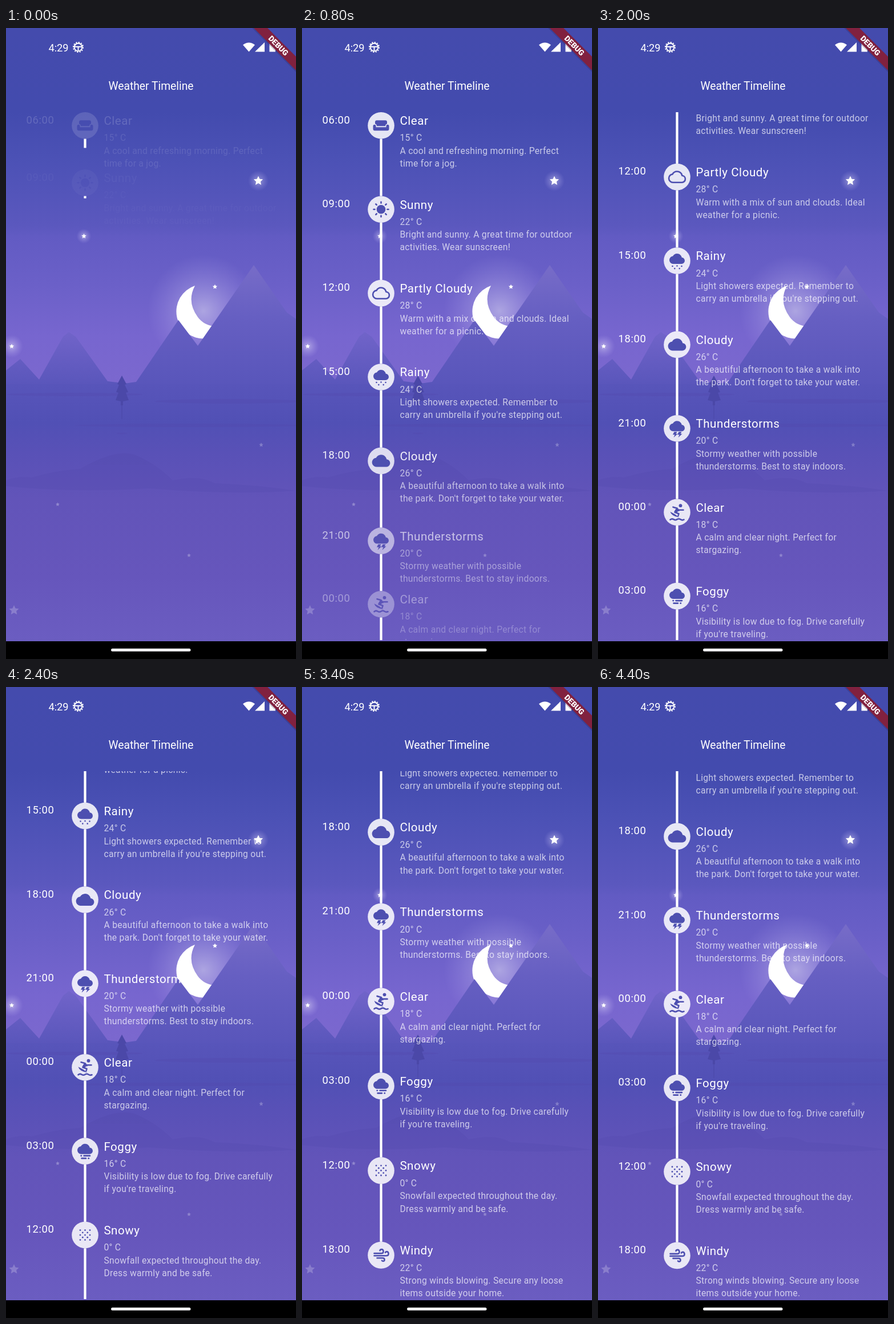
An HTML page that plays this animation: 508 by 1102 pixels, repeating every 4.5 s.

```html
<!DOCTYPE html>
<html lang="en">
<head>
<meta charset="utf-8">
<title>Weather Timeline</title>
<style>
  html, body { margin: 0; width: 100%; height: 100%; overflow: hidden; background: #000; }
  svg { display: block; width: 100%; height: 100%; font-family: Roboto, sans-serif; fill: #fff; }
  .name { font-size: 20.5px; letter-spacing: .56px; }
  .hour { font-size: 18.5px; letter-spacing: .56px; }
  .note { font-size: 15.65px; letter-spacing: .28px; fill-opacity: .7; }
  .ink { fill: #4d4fb0; }
  .line { fill: none; stroke: #4d4fb0; stroke-width: 2.6; stroke-linecap: round; stroke-linejoin: round; }
</style>
</head>
<body>
<svg viewBox="0 0 508 1102">
  <defs>
    <linearGradient id="sky" gradientUnits="userSpaceOnUse" x1="0" y1="0" x2="0" y2="640">
      <stop offset="0" stop-color="#444bad"/>
      <stop offset=".23" stop-color="#434bae"/>
      <stop offset=".35" stop-color="#4b51b5"/>
      <stop offset=".54" stop-color="#5b58be"/>
      <stop offset=".57" stop-color="#625bc3"/>
      <stop offset=".7" stop-color="#6b60c8"/>
      <stop offset=".84" stop-color="#7766cf"/>
      <stop offset="1" stop-color="#7c68ce"/>
    </linearGradient>
    <linearGradient id="hill" gradientUnits="userSpaceOnUse" x1="0" y1="414" x2="0" y2="630">
      <stop offset="0" stop-color="#776cc8"/>
      <stop offset=".42" stop-color="#665fc2"/>
      <stop offset="1" stop-color="#5855ba"/>
    </linearGradient>
    <linearGradient id="range" gradientUnits="userSpaceOnUse" x1="0" y1="530" x2="0" y2="630">
      <stop offset="0" stop-color="#7164c9"/>
      <stop offset="1" stop-color="#5855ba"/>
    </linearGradient>
    <linearGradient id="lake" gradientUnits="userSpaceOnUse" x1="0" y1="622" x2="0" y2="1071">
      <stop offset="0" stop-color="#5855ba"/>
      <stop offset=".15" stop-color="#5150b5"/>
      <stop offset=".27" stop-color="#5951b7"/>
      <stop offset=".45" stop-color="#6254b9"/>
      <stop offset=".75" stop-color="#6656bc"/>
      <stop offset="1" stop-color="#6b5dc1"/>
    </linearGradient>
    <radialGradient id="glow">
      <stop offset="0" stop-color="#fff" stop-opacity=".42"/>
      <stop offset=".5" stop-color="#e8e0ff" stop-opacity=".2"/>
      <stop offset="1" stop-color="#cfc0ff" stop-opacity="0"/>
    </radialGradient>
    <clipPath id="view"><rect y="147" width="508" height="922"/></clipPath>
    <clipPath id="stage"><rect width="508" height="1102"/></clipPath>
    <path id="cloud" d="M7.35-1.96C6.67-5.41 3.64-8 0-8-2.89-8-5.4-6.36-6.65-3.96-9.66-3.64-12-1.09-12 2c0 3.31 2.69 6 6 6h13c2.76 0 5-2.24 5-5 0-2.64-2.05-4.78-4.65-4.96z"/>
  </defs>

  <rect width="508" height="640" fill="url(#sky)"/>
  <circle cx="346" cy="494" r="98" fill="url(#glow)"/>
  <path d="M331 450A47.5 47.5 0 0 0 349 542.5Q370 542 386 519Q353 527 336 505Q316 478 331 450Z"/>
  <path d="M0 598L25 578L58 614L100 539L110 531L122 539L178 617L222 622L222 630H0Z" fill="url(#range)"/>
  <path d="M178 617L200 622L228 618L302 510L336 555L434 414L492 497L508 508V630H178Z" fill="url(#hill)"/>
  <rect y="622" width="508" height="449" fill="url(#lake)"/>
  <g fill="#5349ad" opacity=".3">
    <path d="M0 790Q20 782 45 785Q90 772 130 770Q190 735 225 745Q262 760 292 790Q340 780 365 795Q440 798 508 808Q400 816 250 804Q110 812 0 800Z"/>
    <ellipse cx="120" cy="640" rx="120" ry="3"/>
    <ellipse cx="390" cy="652" rx="130" ry="4"/>
    <ellipse cx="203" cy="708" rx="10" ry="1.5"/>
    <ellipse cx="320" cy="694" rx="200" ry="3"/>
  </g>
  <path d="M203 607L211 622L208 623L214 636L210 637L215 650L205 652V659H201V652L192 650L197 637L193 636L198 623L195 622Z" fill="#4b48a8"/>
  <path d="M203 658v25" stroke="#4b48a8" stroke-width="2" opacity=".5"/>
  <g id="stars"></g>

  <g clip-path="url(#view)"><g id="list"></g></g>

  <text x="254" y="107.5" font-size="19.3" text-anchor="middle">Weather Timeline</text>
  <text x="74.4" y="40.6" font-size="18.3">4:29</text>
  <g transform="translate(126.5 33.6)" fill="none" stroke="#fff">
    <circle r="6.8" stroke-width="1.9"/>
    <circle r="8.6" stroke-width="1.9" stroke-dasharray="2.25 2.25"/>
    <path d="M-6-.8H6M0-.8V6" stroke-width="1.9"/>
  </g>
  <path d="M415 29.5Q425.5 21.5 436 29.5L425.5 41.5Z"/>
  <path d="M453 25V41.5H436Z"/>
  <path d="M461.5 27h3v-2h5v2h2.500v14.500h-10.500z"/>
  <g clip-path="url(#stage)">
    <path d="M431 0L508 77V50L458 0Z" fill="#1c1c50" opacity=".22"/>
    <path d="M434 0L508 74V50L458 0Z" fill="#81213f"/>
    <text transform="translate(477.200 30.800) rotate(45)" y="4.700" font-size="13.400" font-weight="900" text-anchor="middle">DEBUG</text>
  </g>
  <rect y="1071" width="508" height="31" fill="#000"/>
  <rect x="184" y="1083.800" width="139.500" height="5" rx="2.500" fill="#f4f4f6"/>
</svg>
<script>
const LOOP = 4500, STEP = 100;
const TOP = 170.3, DOT = 46.4, ROPE = 100, MIN_H = 100, BOTTOM = 1069;

const dots = (pts, r) => pts.map(([x, y]) => `<circle class="ink" cx="${x}" cy="${y}" r="${r}"/>`).join('');
const cloud = (y, s) => `<use href="#cloud" class="ink" transform="translate(0 ${y}) scale(${s})"/>`;
const stroke = d => `<path class="line" d="${d}"/>`;
const bolt = x => `<path class="ink" d="M${x} 6h5l-2 3.500h3l-7 6.500 2-5h-3.500z"/>`;

const icons = {
  sofa: `<path class="ink" d="M-7.500-9H7.500Q10.500-9 10.500-6V-3Q7.500-2 7.500 1H-7.500Q-7.500-2-10.500-3V-6Q-10.500-9-7.500-9Z"/>
    <path class="ink" d="M-11.500-1.500Q-9-1.500-9 1V3H9V1Q9-1.500 11.500-1.500T14 1V6Q14 9 11 9H-11Q-14 9-14 6V1Q-14-1.500-11.500-1.500Z"/>`,
  sun: '<circle class="ink" r="7.800"/>' + Array.from({ length: 8 }, (_, k) =>
    `<path class="line" d="M0-11V-13" transform="rotate(${k * 45})"/>`).join(''),
  partly: '<use href="#cloud" class="line" transform="scale(1.200)" style="stroke-width:2.200"/>',
  rain: cloud(-3.5, 1.12) + dots([[-8, 9.5], [0, 9], [8, 9.5], [-4.2, 13.6], [4.2, 13.6]], 1.3),
  cloudy: cloud(0, 1.32),
  storm: cloud(-4, 1.12) + bolt(-5) + bolt(3),
  surf: '<circle class="ink" cx="6" cy="-11.500" r="2.900"/>' +
    stroke('M-7-9L0-7L3-3M0-7L-4 0L3 2.500L2 6M3-4L11-4') +
    '<path class="ink" d="M-12-1Q-3 3 4 9Q-10 7-12-1ZM-1-7L4-4L-1 1L-5-1Z"/>' +
    stroke('M-12 13Q-9 10.500-6 12.500T0 12.500T6 12.500T12 13'),
  fog: cloud(-4, 1.12) + stroke('M-7 8H-6.500M-2 8H8.500M-6 12.500H1.500M6 12.500H6.500'),
  snow: dots([-8.5, 0, 8.5].flatMap(y => [[-8.5, y], [0, y], [8.5, y]])
    .concat([-4.2, 4.2].flatMap(y => [[-4.2, y], [4.2, y]])), 1.4),
  wind: stroke('M-12-3H0Q4-3 4-6.500Q4-10 1-10Q-1.500-10-2-8M-12 1H9Q13 1 13-2.500Q13-6 10-6Q8-6 7.500-4.500M-7 5H3Q6 5 6 8Q6 10.500 3.500 10.500Q2 10.500 1.500 9.500')
};

const rows = [
  ['06:00', 'sofa', 'Clear', 15, 'A cool and refreshing morning. Perfect', 'time for a jog.'],
  ['09:00', 'sun', 'Sunny', 22, 'Bright and sunny. A great time for outdoor', 'activities. Wear sunscreen!'],
  ['12:00', 'partly', 'Partly Cloudy', 28, 'Warm with a mix of sun and clouds. Ideal', 'weather for a picnic.'],
  ['15:00', 'rain', 'Rainy', 24, 'Light showers expected. Remember to', "carry an umbrella if you're stepping out."],
  ['18:00', 'cloudy', 'Cloudy', 26, 'A beautiful afternoon to take a walk into', "the park. Don't forget to take your water."],
  ['21:00', 'storm', 'Thunderstorms', 20, 'Stormy weather with possible', 'thunderstorms. Best to stay indoors.'],
  ['00:00', 'surf', 'Clear', 18, 'A calm and clear night. Perfect for', 'stargazing.'],
  ['03:00', 'fog', 'Foggy', 16, 'Visibility is low due to fog. Drive carefully', "if you're traveling."],
  ['12:00', 'snow', 'Snowy', 0, 'Snowfall expected throughout the day.', 'Dress warmly and be safe.'],
  ['18:00', 'wind', 'Windy', 22, 'Strong winds blowing. Secure any loose', 'items outside your home.']
];

const text = (cls, x, y, s) => `<text class="${cls}" x="${x}" y="${y}">${s}</text>`;
const list = document.getElementById('list');
list.innerHTML = rows.map(([hour, icon, name, deg, a, b]) => `<g>
  <rect x="136.400" y="${DOT / 2}" width="4.200"/>
  <g>
    <circle cx="138.500" r="23.300" fill-opacity=".86"/>
    <g transform="translate(138.500 0)">${icons[icon]}</g>
    ${text('hour', 35.6, -3.8, hour)}
    ${text('name', 171.4, -1.1, name)}
    ${text('note', 171.5, 27.2, deg + '° C')}
    ${text('note', 171.5, 49.5, a)}
    ${text('note', 171.5, 71.6, b)}
  </g></g>`).join('');
const items = [...list.children].map(g => ({ g, rope: g.children[0], body: g.children[1] }));

// x, y, radius, opacity, glow radius
document.getElementById('stars').innerHTML = [
  [442, 267, 8.5, 1, 18], [136.5, 363.5, 4.5, .95, 13], [366, 452, 4.3, 1, 0], [10, 556, 4.3, 1, 20],
  [447, 728, 4, .25, 0], [90.5, 832, 3.6, .3, 0], [320.5, 921, 3.6, .28, 0], [14, 1017, 9, .22, 0]
].map(([x, y, r, o, halo]) => {
  const pts = Array.from({ length: 10 }, (_, k) => {
    const a = k * Math.PI / 5, q = k % 2 ? r * .48 : r;
    return (q * Math.sin(a)).toFixed(2) + ',' + (-q * Math.cos(a)).toFixed(2);
  });
  return `<g transform="translate(${x} ${y})"><circle r="${halo}" fill="url(#glow)"/><polygon points="${pts.join(' ')}" opacity="${o}"/></g>`;
}).join('');

const clamp = x => Math.min(1, Math.max(0, x));

// time, offset, speed
const path = [[1400, 0, 0], [2000, 203, .4], [2700, 471.5, .11], [3100, 495, 0]];
function scrollAt(t) {
  if (t <= path[0][0]) return 0;
  for (let i = 1; i < path.length; i++) {
    const [t0, y0, v0] = path[i - 1], [t1, y1, v1] = path[i];
    if (t > t1) continue;
    const d = t1 - t0, u = (t - t0) / d, w = 1 - u;
    return w * w * (1 + 2 * u) * y0 + u * u * (3 - 2 * u) * y1 + d * u * w * (w * v0 - u * v1);
  }
  return path[path.length - 1][1];
}

function draw(t) {
  let y = TOP;
  items.forEach(({ g, rope, body }, i) => {
    const p = clamp((t + 197 - 110 * i) / 580) ** 1.7;
    const len = ROPE * p;
    g.setAttribute('transform', `translate(0 ${y})`);
    rope.setAttribute('height', i < items.length - 1 ? len : 0);
    body.setAttribute('opacity', p);
    y += Math.max(MIN_H, DOT + len);
  });
  const stretch = 1 + .0092 * Math.sin(Math.PI * clamp((t - 3000) / 800));
  list.setAttribute('transform',
    `translate(0 ${BOTTOM}) scale(1 ${stretch}) translate(0 ${-BOTTOM - scrollAt(t)})`);
}

const start = performance.now();
function tick() {
  const t = (performance.now() - start) % LOOP;
  draw(Math.floor(t / STEP) * STEP);
  requestAnimationFrame(tick);
}
tick();
</script>
</body>
</html>
```
